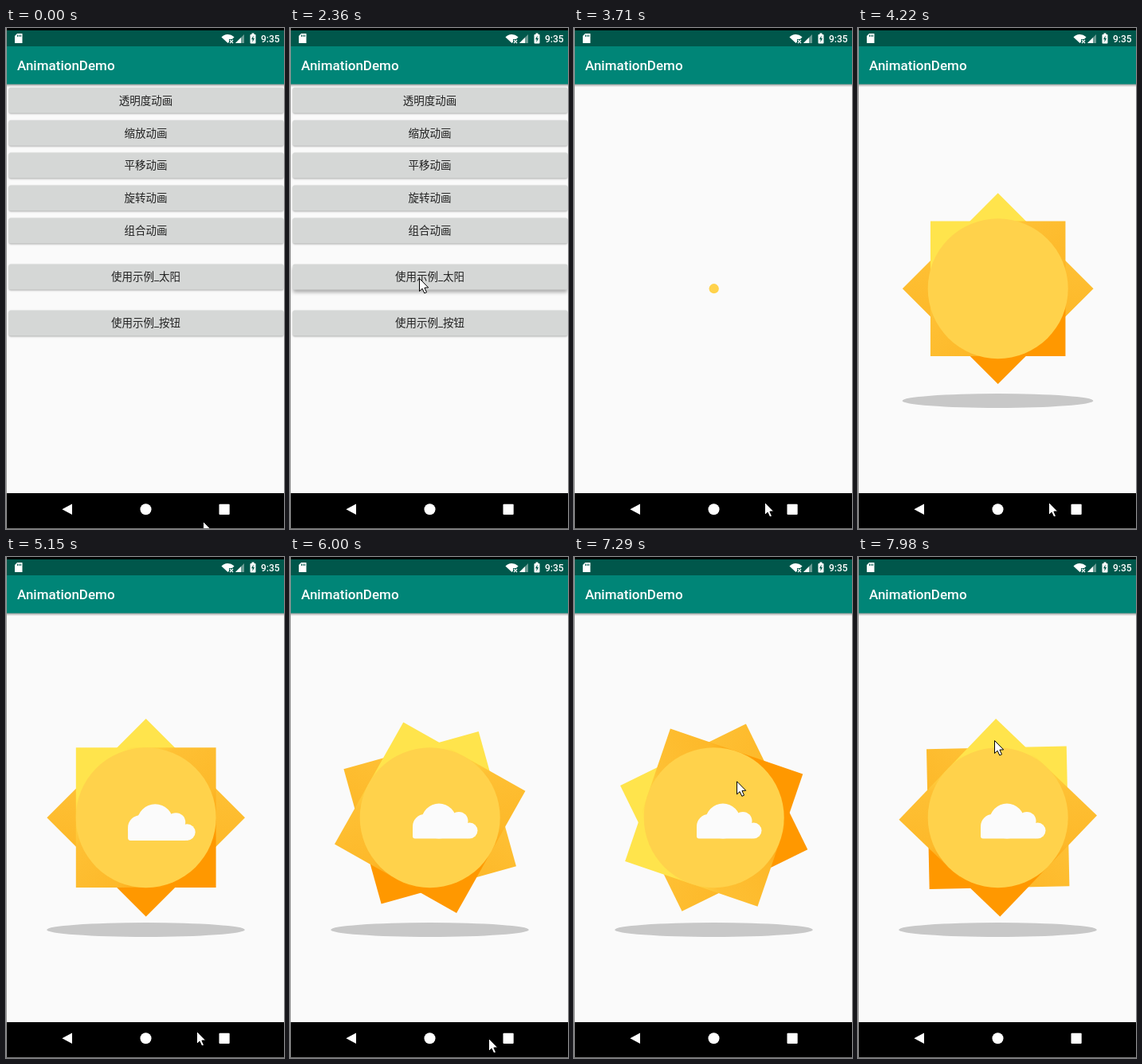
Write an HTML page with a canvas that moves like this. It is 349 px wide and 629 px high and loops after 8000 ms.

```html
<!DOCTYPE html>
<html lang="zh">
<head>
<meta charset="utf-8">
<style>
html, body { margin: 0; width: 100%; height: 100%; overflow: hidden; background: #fafafa; }
canvas { display: block; }
</style>
</head>
<body>
<canvas id="stage" width="349" height="629"></canvas>
<script>
const ctx = document.getElementById('stage').getContext('2d');
const LOOP = 8000, W = 349, H = 629;
const TICK = 133.8, PHASE = 65;          // refresh rhythm of the screen, ms
const PRESS = 2339, OPENED = 2740, SPIN = 5684;
const CX = 175.7, CY = 327.2, DISC_R = 88, STAR_R = 124.3;
const SUN = '#ffd24b', DARK = '#00574b';
const LABELS = ['透明度动画', '缩放动画', '平移动画', '旋转动画', '组合动画', '使用示例_太阳', '使用示例_按钮'];
const PRESSED = 5;

// Cursor strokes: start, end, x, y.
const STROKES = [
  [0, 130, 247, 640], [130, 520, 168, 366], [520, 780, 162, 314], [3140, 3540, 239, 595],
  [5600, 5950, 249, 604], [6220, 6750, 339, 491], [6760, 7420, 171, 230]
];

const progress = (t, from, to) => Math.min(1, Math.max(0, (t - from) / (to - from)));
const mix = (a, b, k) => a + (b - a) * k;
const easeOut = p => 1 - (1 - p) ** 5;
const overshoot = p => 1 + 2.7 * (p - 1) ** 3 + 1.7 * (p - 1) ** 2;

function rect(color, x, y, w, h, r = 0) {
  ctx.fillStyle = color;
  ctx.beginPath();
  ctx.roundRect(x, y, w, h, r);
  ctx.fill();
}

function ellipse(color, x, y, rx, ry = rx) {
  ctx.fillStyle = color;
  ctx.beginPath();
  ctx.ellipse(x, y, rx, ry, 0, 0, Math.PI * 2);
  ctx.fill();
}

function polygon(color, ...pts) {
  ctx.fillStyle = color;
  ctx.beginPath();
  for (let i = 0; i < pts.length; i += 2) ctx.lineTo(pts[i], pts[i + 1]);
  ctx.closePath();
  ctx.fill();
}

function text(str, x, y, font, color, align = 'left') {
  ctx.font = font;
  ctx.fillStyle = color;
  ctx.textAlign = align;
  ctx.fillText(str, x, y);
}

function statusBar() {
  rect(DARK, 0, 0, W, 23);
  rect('#000', 0, 0, W, 3);
  // memory card
  polygon('#fff', 14, 7, 20.5, 7, 20.5, 19, 11, 19, 11, 10);
  for (let x = 14; x < 20; x += 2) rect(DARK, x, 8.5, 1, 2.5);
  // wireless
  ctx.fillStyle = '#fff';
  ctx.beginPath();
  ctx.moveTo(278.5, 19);
  ctx.arc(278.5, 19, 11, -Math.PI * .76, -Math.PI * .24);
  ctx.fill();
  rect(DARK, 280, 14, 6, 6);
  ctx.strokeStyle = '#fff';
  ctx.lineWidth = 1.2;
  ctx.beginPath();
  ctx.moveTo(281, 15); ctx.lineTo(285, 19);
  ctx.moveTo(285, 15); ctx.lineTo(281, 19);
  ctx.stroke();
  // signal
  polygon('#6b9b93', 299, 8, 299, 19, 288, 19);
  polygon('#fff', 295, 12, 295, 19, 288, 19);
  // battery
  rect('#fff', 306.5, 8, 7, 11.5, 1);
  rect('#fff', 308.5, 6.5, 3, 2);
  polygon(DARK, 310.6, 9.5, 308, 14.3, 309.7, 14.3, 309.4, 18, 312, 13, 310.4, 13);
  text('9:35', 320, 17.5, '500 12px Roboto, sans-serif', '#fff');
}

function appWindow() {
  rect('#fafafa', 0, 23, W, 561);
  const shade = ctx.createLinearGradient(0, 70, 0, 74);
  shade.addColorStop(0, 'rgba(0,0,0,.42)');
  shade.addColorStop(1, 'rgba(0,0,0,0)');
  rect(shade, 0, 70, W, 4);
  rect('#008577', 0, 23, W, 47.4);
  text('AnimationDemo', 14, 53.3, '500 17px Roboto, sans-serif', '#fff');
}

function navBar() {
  rect('#000', 0, 584, W, 45);
  polygon('#fff', 70.4, 604.2, 83, 597.4, 83, 611);
  ellipse('#fff', 175.5, 604.2, 7);
  rect('#fff', 267.5, 597.8, 13.2, 13.2, 1);
}

function menu(pressed) {
  LABELS.forEach((label, i) => {
    const y = 74.8 + i * 40.9 + Math.max(0, i - 4) * 17.1;
    const lifted = pressed && i === PRESSED;
    ctx.save();
    ctx.shadowColor = 'rgba(0,0,0,.3)';
    ctx.shadowBlur = lifted ? 4 : 2;
    ctx.shadowOffsetY = lifted ? 3.5 : 1;
    rect('#d5d7d6', 3.6, y, 344.8, 32, 2);
    ctx.restore();
    text(label, 175.5, y + 20.8, '13.5px Roboto, "Noto Sans CJK SC", "Noto Sans CJK", sans-serif', '#222', 'center');
  });
}

function arc(radius, width, from, to) {
  ctx.strokeStyle = SUN;
  ctx.lineWidth = width;
  ctx.beginPath();
  ctx.arc(CX, CY, radius, from, to);
  ctx.stroke();
}

// A ring opens outwards, then four arcs close in on the centre.
function intro(t) {
  const open = progress(t, 2870, 3350), close = progress(t, 3350, 3670);
  if (open < 1) {
    const outer = DISC_R * Math.min(1, open * 2), inner = DISC_R * open;
    arc((outer + inner) / 2, outer - inner, 0, Math.PI * 2);
  } else if (close < 1) {
    for (let a = 0; a < 6; a += Math.PI / 2) arc(52 * (1 - close), 4, a, a + .9);
  }
}

function star(radius, degrees) {
  const half = radius / Math.SQRT2;
  for (const offset of [45, 0]) {
    ctx.save();
    ctx.translate(CX, CY);
    ctx.rotate((degrees + offset) * Math.PI / 180);
    const fill = ctx.createLinearGradient(-half, -half, half, half);
    fill.addColorStop(.18, '#ffe44c');
    fill.addColorStop(.36, '#fec034');
    fill.addColorStop(.64, '#fdb92a');
    fill.addColorStop(.82, '#ff9800');
    rect(fill, -half, -half, half * 2, half * 2);
    ctx.restore();
  }
}

// Turns anticlockwise, about once a second, slowly gaining speed.
function turn(t) {
  const s = t - SPIN;
  return s < 0 ? 0 : 117 - .3236 * s - 1.1e-5 * s * s;
}

function cloud(p) {
  const white = '#fbfbfb', scale = overshoot(p);
  ctx.save();
  ctx.translate(mix(198, 194.5, p), mix(340, 331.2, p));
  ctx.scale(scale, scale);
  ctx.translate(-194.5, -331.2);
  ellipse(white, 187, 331.5, 22);
  ellipse(white, 169, 338, 15);
  ellipse(white, 212, 331.5, 11.5);
  ellipse(white, 225.5, 343.5, 10);
  rect(white, 154, 337, 72, 16.5, 3);
  ctx.restore();
}

function sun(t) {
  intro(t);
  const grow = easeOut(progress(t, 3960, 4480));
  if (grow > 0) {
    ellipse('#c8c8c8', 175.5, 468, STAR_R * grow, 9);
    star(STAR_R * grow, turn(t));
  }
  ellipse(SUN, CX, CY, DISC_R * progress(t, 3658, 3940));
  const drift = progress(t, 4540, 5280);
  if (drift > 0) cloud(drift);
}

function cursor(t) {
  let x = 247, y = 619;
  for (const [from, to, toX, toY] of STROKES) {
    const k = progress(t, from, to);
    x = mix(x, toX, k);
    y = mix(y, toY, k);
  }
  ctx.save();
  ctx.translate(x + .5, y + .5);
  polygon('#fff', 0, 0, 0, 16, 3.6, 12.7, 6.3, 18.5, 9, 17.3, 6.4, 11.6, 11.2, 11.4);
  ctx.strokeStyle = '#000';
  ctx.lineWidth = 1;
  ctx.stroke();
  ctx.restore();
}

function draw(t) {
  ctx.clearRect(0, 0, W, H);
  const open = progress(t, PRESS, OPENED);
  if (open < 1) {
    appWindow();
    menu(t >= PRESS);
  }
  if (open > 0) {
    ctx.save();
    ctx.globalAlpha = open;
    ctx.translate(0, 45 * (1 - open) ** 2);
    appWindow();
    ctx.restore();
    sun(t);
  }
  statusBar();
  navBar();
  cursor(t);
  rect('#999', 0, 0, 1, H);
  rect('#777', 0, H - 1, W, 1);
}

const start = performance.now();
function frame() {
  const now = (performance.now() - start) % LOOP;
  draw(Math.max(0, Math.floor((now - PHASE) / TICK) * TICK + PHASE));
  requestAnimationFrame(frame);
}
frame();
</script>
</body>
</html>
```
